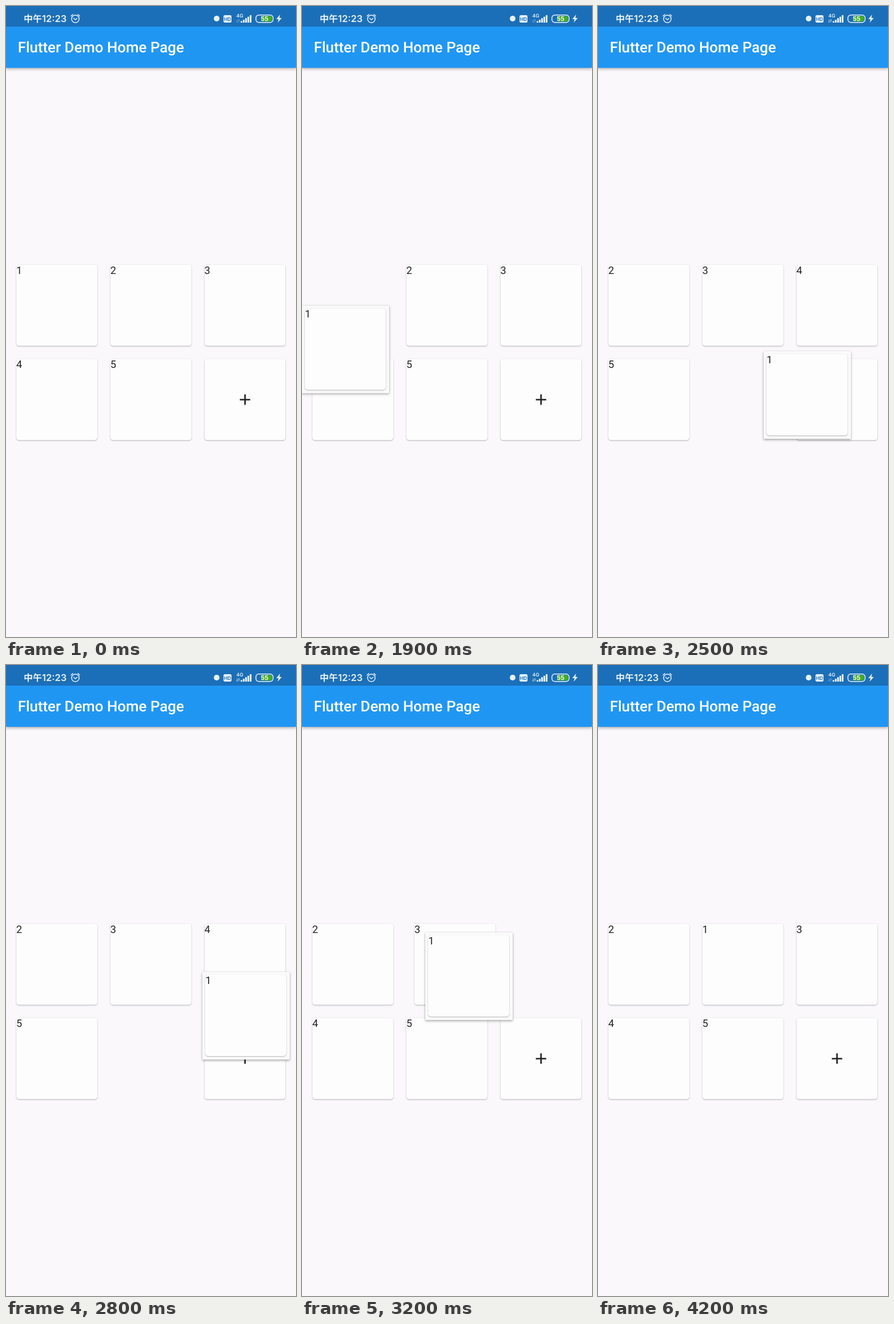
An HTML page for the animation above (5.6 s loop, 508 by 1102 pixels).

```html
<!DOCTYPE html>
<html lang="en">
<head>
<meta charset="utf-8">
<title>Reorderable grid</title>
<style>
  html, body { margin: 0; width: 100%; height: 100%; overflow: hidden; background: #faf8fb; }
  body { position: relative; font-family: Roboto, sans-serif; text-rendering: geometricPrecision; }
  header {
    position: absolute; top: 0; left: 0; width: 508px; height: 108px;
    background: linear-gradient(#1b6fb8 36px, #2096f3 36px);
    box-shadow: 0 2px 5px rgba(0, 0, 0, .32);
  }
  .card, #lift { position: absolute; left: 0; top: 0; }
  .card {
    width: 142.3px; height: 142.3px; border-radius: 5px; background: #fefdfe;
    color: #212121; font-size: 18.1px; line-height: 21px;
    box-shadow: 0 1px 2px rgba(0, 0, 0, .28), 0 0 1px rgba(0, 0, 0, .1);
  }
  .card svg { width: 100%; height: 100%; }
  #lift {
    width: 152.6px; height: 152.6px; background: #fbfafb;
    box-shadow: 0 2px 4px rgba(0, 0, 0, .3), 0 0 2px rgba(0, 0, 0, .12);
  }
  #lift .card { left: 5.2px; top: 5.2px; }
</style>
</head>
<body>
<header>
  <svg width="508" height="108" fill="#e8f2fa" font-family="Inter, sans-serif" font-weight="600">
    <text x="31" y="28" font-size="16" font-family="Noto Sans CJK SC, Noto Sans CJK, sans-serif" font-weight="700">中午</text>
    <text x="63" y="28" font-size="16.5">12:23</text>
    <g fill="none" stroke="#e8f2fa" stroke-width="1.5" stroke-linecap="round">
      <circle cx="121.5" cy="22.5" r="6.6"/>
      <path d="M114 17.5l3-2.8M129 17.5l-3-2.8M118.5 21.5l3 2.5l3-2.5"/>
      <rect x="437.8" y="15.8" width="30" height="13" rx="5"/>
    </g>
    <circle cx="369" cy="22" r="5"/>
    <rect x="381" y="16" width="14" height="13" rx="2.5"/>
    <text x="388" y="25.8" font-size="8.5" text-anchor="middle" fill="#1b6fb8">HD</text>
    <text x="403.5" y="20" font-size="8.5">4G</text>
    <path id="arrows" d="M405 23.5v5l-1.3-1.5M408 28.5v-5l1.3 1.5" fill="none" stroke="#e8f2fa"/>
    <path id="signal"/>
    <rect x="447" y="17.5" width="19" height="9.6" rx="3" fill="#43ad26"/>
    <text x="453" y="26.3" font-size="11" text-anchor="middle" fill="#fff">55</text>
    <path d="M480 15l-6.5 8h4l-1.5 6l7-8h-4z"/>
    <text x="20.7" y="81" font-family="Roboto, sans-serif" font-size="25.87" font-weight="500" fill="#fff">Flutter Demo Home Page</text>
  </svg>
</header>
<main id="grid"></main>
<div id="lift"><div class="card">1</div></div>
<script>
const LOOP = 5600, TICK = 100, SHIFT = 250, LIFT = 1200, DROP = 4200;

// When the gap for card 1 opens at which slot
const gaps = [[0, 0], [1900, 3], [2155, 4], [2850, 2], [3155, 1]];

// Key points of the finger path: time, then corner of the lifted card
const path = [
  [1700, 13, 447], [1950, 4, 540], [2200, 89, 604], [2450, 270, 610],
  [2800, 344, 536], [3200, 216, 467], [3700, 111, 461], [DROP, 126, 444]
];

const byId = id => document.getElementById(id);
const lift = byId('lift');
const clamp = (v, lo, hi) => Math.max(lo, Math.min(hi, v));
const ease = v => v * v * (3 - 2 * v);
const mix = (a, b, p) => a.map((v, i) => v + (b[i] - v) * p);
const slot = i => [18.1 + 164.75 * (i % 3), 451.6 + 164.75 * Math.floor(i / 3)];
const place = (el, [x, y]) => { el.style.transform = `translate(${x}px, ${y}px)`; };

function addCard(content) {
  const el = document.createElement('div');
  el.className = 'card';
  el.innerHTML = content;
  return byId('grid').appendChild(el);
}

const cards = [1, 2, 3, 4, 5].map(addCard);
place(addCard('<svg><path d="M62 71.1h18.2M71.1 62v18.2" stroke="#212121" stroke-width="2.6"/></svg>'), slot(5));

byId('signal').setAttribute('d', [0, 1, 2, 3, 4]
  .map(i => `M${411 + 4 * i} 29h3v${-2.5 - 2.6 * i}h-3z`).join(''));

// Smooth curve through the key points
function dragPoint(time) {
  const t = clamp(time, path[0][0], DROP);
  const last = path.length - 1;
  const i = clamp(path.findIndex(k => k[0] > t) - 1, 0, last - 1);
  const [a, b] = [path[i], path[i + 1]];
  const span = b[0] - a[0], u = (t - a[0]) / span;
  const slope = (n, axis) => {
    const p = path[Math.max(0, n - 1)], q = path[Math.min(last, n + 1)];
    return (q[axis] - p[axis]) / (q[0] - p[0]);
  };
  return [1, 2].map(axis => a[axis] + (b[axis] - a[axis]) * ease(u)
    + span * u * (1 - u) * ((1 - u) * slope(i, axis) - u * slope(i + 1, axis)));
}

// Slot of a card while the gap is at the given index
const slotOf = (card, gap) => slot(card === 0 ? gap : card <= gap ? card - 1 : card);

function draw(t) {
  const held = t >= LIFT && t < DROP;
  const n = gaps.filter(g => g[0] <= t).length - 1;
  const [start, gap] = gaps[n];
  const before = gaps[Math.max(0, n - 1)][1];
  const p = ease(clamp((t - start) / SHIFT, 0, 1));

  cards.forEach((el, i) => place(el, mix(slotOf(i, before), slotOf(i, gap), p)));
  cards[0].style.visibility = held ? 'hidden' : 'visible';
  lift.style.visibility = held ? 'visible' : 'hidden';
  place(lift, t < path[0][0] ? path[0].slice(1) : dragPoint(t));
  byId('arrows').setAttribute('opacity', held && t >= 2200 ? .9 : .45);
}

function frame() {
  const t = performance.now() % LOOP;
  draw(Math.floor(t / TICK) * TICK);
  requestAnimationFrame(frame);
}
frame();
</script>
</body>
</html>
```
